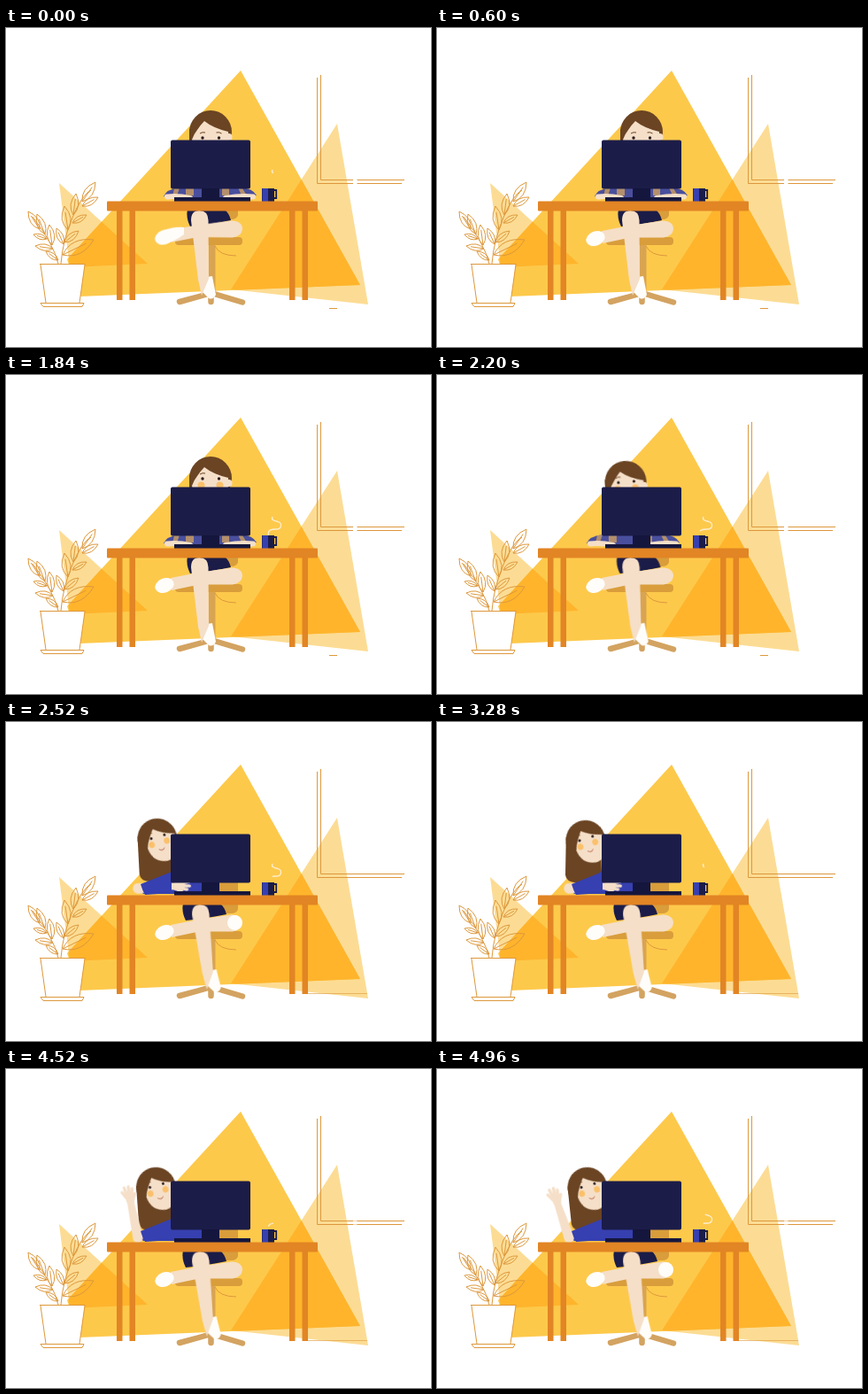
These frames come from a looping animation (480 px wide and 360 px high, 5000 ms). An HTML page:

```html
<!DOCTYPE html>
<html lang="en">
<head>
<meta charset="utf-8">
<title>Waving from the desk</title>
<style>
html, body { margin: 0; width: 100%; height: 100%; overflow: hidden; background: #fff; }
svg { display: block; width: 100vw; height: 100vh; }
.anim, .anim * { animation: 0s linear infinite; }
.line { fill: none; stroke: #dd983c; stroke-width: 1; }
.skin { fill: #f5dfc8; }
.limb { fill: none; stroke: #f5dfc8; stroke-linecap: round; }
.hair { fill: #6b4423; }
.navy { fill: #1b1c48; }
.wood { fill: #e28524; }
.chair { fill: #d99d3b; }
.shirt { fill: #3640b0; }
.foot { fill: #fffdfa; }

#head { animation: head 5s infinite ease-in-out; }
@keyframes head {
  0%, 23.2% { transform: translate(231px, 118px); }
  30%, 41% { transform: translate(231px, 117px); }
  49%, 50.4% { transform: translate(171px, 132px) rotate(-16deg) scale(.93); }
  58%, 65.6% { transform: translate(168px, 134px) rotate(-18deg) scale(.93); }
  74%, 80.8% { transform: translate(169px, 134px) rotate(-16deg) scale(.93); }
  99.2%, 100% { transform: translate(170px, 134px) rotate(-16deg) scale(.93); }
}
#mane { animation: mane 5s infinite ease-in-out; }
@keyframes mane {
  0%, 41% { transform: none; }
  50.4% { transform: rotate(13deg); }
  65.6% { transform: rotate(19deg); }
  80.8% { transform: rotate(14deg); }
  99.2%, 100% { transform: rotate(10deg); }
}
#face { animation: face 5s infinite ease-in-out; }
@keyframes face {
  0%, 41% { transform: none; }
  49%, 100% { transform: translate(4px, 0) scale(.88, 1); }
}
#looks { animation: looks 5s infinite ease-in-out; }
@keyframes looks {
  0%, 24% { transform: translateY(6px); }
  30%, 41% { transform: none; }
  49%, 100% { transform: translate(1px, -2.5px) scale(.9, 1); }
}
#typing { animation: typing 5s infinite ease-in-out; }
@keyframes typing {
  0%, 41% { transform: none; opacity: 1; }
  44.8% { transform: translateX(-10px); opacity: 1; }
  44.81%, 100% { transform: translateX(-10px); opacity: 0; }
}
#lean { animation: lean 5s infinite ease-out; }
@keyframes lean {
  0%, 44.8% { transform: translateX(28px); opacity: 0; }
  44.81% { transform: translateX(28px); opacity: 1; }
  49%, 100% { transform: none; opacity: 1; }
}
#arm { transform-origin: 150px 189px; animation: arm 5s infinite ease-in-out; }
@keyframes arm {
  0%, 67% { transform: rotate(107deg); }
  74.4%, 80.8%, 87.2%, 93.6% { transform: none; }
  77.6%, 84%, 90.4%, 96.8% { transform: rotate(9deg); }
  99.2%, 100% { transform: rotate(2deg); }
}
#shin { transform-origin: 219px 215px; animation: shin 5s infinite ease-in-out; }
@keyframes shin {
  0%, 41% { transform: none; }
  49%, 100% { transform: translateX(1px) rotate(-3.2deg); }
}
#skirt { animation: skirt 5s infinite ease-in-out; }
@keyframes skirt {
  0%, 41% { transform: none; }
  49%, 100% { transform: translateX(-5px); }
}
#cross { transform-origin: 258px 228px; animation: cross 5s infinite ease-in-out; }
@keyframes cross {
  0% { transform: rotate(1deg); }
  23.2% { transform: rotate(-1deg); }
  36.8%, 100% { transform: none; }
}
#knee { animation: knee 5s infinite step-end; }
@keyframes knee {
  0% { opacity: 0; }
  49% { opacity: 1; }
  54% { opacity: 0; }
  95% { opacity: 1; }
}
#sock { animation: sock 5s infinite step-end; }
@keyframes sock { 0% { opacity: 1; } 7% { opacity: 0; } }
#steam { animation: steam 5s infinite linear; }
@keyframes steam {
  0% { stroke-dasharray: .12 2; stroke-dashoffset: -.88; }
  8% { stroke-dasharray: 0 2; stroke-dashoffset: -1; }
  8.01%, 17.9% { stroke-dasharray: 0 2; stroke-dashoffset: 0; }
  23.2% { stroke-dasharray: .35 2; stroke-dashoffset: -.12; }
  36.8% { stroke-dasharray: 1 2; stroke-dashoffset: 0; }
  50.4% { stroke-dasharray: .75 2; stroke-dashoffset: -.25; }
  65.6% { stroke-dasharray: .12 2; stroke-dashoffset: -.88; }
  70% { stroke-dasharray: 0 2; stroke-dashoffset: -1; }
  70.01%, 86% { stroke-dasharray: 0 2; stroke-dashoffset: 0; }
  99.2%, 100% { stroke-dasharray: .6 2; stroke-dashoffset: -.25; }
}
#dash { animation: dash 5s infinite step-end; }
@keyframes dash { 0% { opacity: 1; } 46% { opacity: 0; } }
#floor { animation: floor 5s infinite step-end; }
@keyframes floor { 0% { opacity: 0; } 46% { opacity: .6; } }
#gap { animation: gap 5s infinite step-end; }
@keyframes gap { 0% { opacity: 1; } 46% { opacity: 0; } 76% { opacity: 1; } 88% { opacity: .6; } }
</style>
</head>
<body>
<svg viewBox="0 0 480 360">
  <defs>
    <path id="big" d="M265 48 L400 290 L83 303 L69 261 Z"/>
    <clipPath id="inBig"><use href="#big"/></clipPath>
    <path id="sides" d="M60 175 L160 266 L72 270 Z M374 108 L409 312 L254 295 Z"/>
  </defs>

  <!-- backdrop -->
  <use href="#sides" fill="#fcdc94"/>
  <use href="#big" fill="#fdc94b"/>
  <use href="#sides" fill="#ffb42c" clip-path="url(#inBig)"/>
  <path class="line" stroke-width="1.2" d="M351.5 56 V175.5 H447 M355.5 53 V171.5 H450"/>
  <path id="gap" fill="#fff" d="M392 169 h4.500 v8 h-4.500 z"/>
  <path id="dash" class="line" d="M365 316.500 h9"/>
  <path id="floor" class="line" d="M341 306.500 h67"/>

  <!-- plant -->
  <path fill="#fff" d="M38 266 H89 L83 311 H45 Z"/>
  <path class="line" d="M38 266.500 H89.500 M39 267 L45 310 M89 267 L83 310 M39 310.500 H88 L86 314.500 H42 Z"/>
  <g id="plant" class="line"></g>

  <!-- chair -->
  <path class="chair" d="M207 200 H262 V211 Q261 216 254 216 H215 Q207 216 207 208 Z M240 178 h22 v24 h-22 z"/>
  <path fill="#d9a452" d="M229 244 h7.500 v58 h-7.500 z"/>
  <path fill="none" stroke="#d3a361" stroke-width="6.500" stroke-linecap="round" d="M232 299 L218 303 L196 309 M232 299 L245 303 L267 309.500 M231.500 300 V309"/>
  <rect class="chair" x="191" y="236" width="76" height="9" rx="4"/>
  <path class="line" stroke="#c88a35" d="M236 246 Q241 257 260 257"/>

  <!-- person, upper half -->
  <g id="typing">
    <path fill="#4a4f9d" d="M196 180 H265 Q279 181 283 189 L270 192 H190 L178 190 Q181 182 196 180 Z"/>
    <path fill="#d6a55c" opacity=".75" d="M190 181 l6 -1 -3 10 h-5 z M203 180 h9 v9 h-9 z M244 180 h8 v9 h-8 z M262 180 l5 1 5 8 h-6 z"/>
    <path class="limb" stroke-width="6" d="M182 190.500 Q194 189 208 192 M279 190.500 Q265 189 248 192"/>
  </g>
  <g id="lean">
    <path class="shirt" d="M188 166 H222 V194 H155 Q150 190 151 184 Q168 178 188 166 Z"/>
  </g>
  <g id="head">
    <path id="mane" class="hair" d="M-24 -4 L-24 42 Q-23 50 -12 51 Q6 52 20 36 L18 0 Z"/>
    <ellipse class="hair" cy="-.5" rx="24" ry="24.500"/>
    <g id="face" class="skin">
      <circle cx="20.500" cy="5" r="4"/>
      <path d="M-21 8 Q-19 2 -15 -3 Q-11 -9 -7 -13 Q3 -5 20 -1 V9 Q19 27 1 29 Q-19 27 -21 8 Z"/>
    </g>
    <g id="looks">
      <circle cx="-9" cy="0" r="1.700" fill="#2a1c1c"/>
      <circle cx="9.500" cy="0" r="1.700" fill="#2a1c1c"/>
      <path fill="none" stroke="#6b4423" d="M-12 -5 q3 -2 6 -1 M6.500 -6 q3 -1 6 1"/>
      <circle cx="-10.500" cy="7.500" r="4" fill="#fbc06a"/>
      <circle cx="10.500" cy="7.500" r="4" fill="#fbc06a"/>
      <path fill="none" stroke="#b5563c" d="M-3 15 q4 4 8 0"/>
    </g>
  </g>
  <g id="lean2" style="animation:lean 5s infinite ease-out">
    <g id="arm">
      <path class="skin" d="M144 193 L131 153 L138 150 L155 189 Q155 196 149 196 Q145 196 144 193 Z"/>
      <path class="skin" d="M127 146 Q127 141 134 140 Q139 144 139 152 Q135 156 131 154 Z"/>
      <path class="limb" stroke-width="3.400" d="M129 148 L123.500 143 M130 146 L125 137.500 M132 145 L129.500 135.500 M135 145 L134 137 M137 149 L138 142"/>
    </g>
    <path class="shirt" d="M152 183 L187 169 V193 L157 195 Q154 190 152 183 Z" id="sleeve"/>
  </g>

  <!-- person, lower half -->
  <path id="skirt" class="navy" d="M205 205 H247 Q252 209 254 217 Q230 222 208 224 Q203 214 205 205 Z"/>
  <g id="cross">
    <path class="skin" d="M186 229 Q215 223 255 217.500 Q267 218 267 227 Q266 235 256 236.500 H218 L187 243 Z"/>
    <ellipse class="foot" cx="179" cy="237.500" rx="11" ry="8" transform="rotate(-22 179 237.500)"/>
    <path id="sock" class="foot" d="M178 230 Q190 225 201 226 V234 Q190 243 178 245 Z"/>
    <ellipse id="knee" class="foot" cx="258.500" cy="226.500" rx="8.500" ry="8.500"/>
  </g>
  <g id="shin">
    <path class="foot" d="M221 282 L233 280 L237 301 Q234 307 229 305 L222 298 Z"/>
    <path class="skin" d="M209 217 Q209 206 218.500 206 Q228 206 228.500 217 L229 283 Q226 290 221 302 L217 284 Z"/>
  </g>

  <!-- desk and things on it -->
  <path id="steam" pathLength="1" fill="none" stroke="#fdeed0" stroke-width="1.300" d="M296.500 181 C295 174 301 174 305 174 C312 174 312 167 307 165.500 C303 164.500 299 163.500 301 160"/>
  <path fill="none" stroke="#1b1c48" stroke-width="1.800" d="M302 183 h3.200 v9 h-3.200"/>
  <path class="navy" d="M289 181 h14 v15 h-14 z"/>
  <path class="shirt" d="M289.500 181 h6.500 v15 h-6.500 z"/>
  <rect class="navy" x="186" y="126.500" width="90" height="55" rx="2"/>
  <path fill="#15163d" d="M221 181 h20 v10 h35 v5 h-86 v-5 h31 z"/>
  <path class="wood" d="M125 205 h6.500 v102 h-6.500 z M139.500 205 h6.500 v102 h-6.500 z M320 205 h6.500 v102 h-6.500 z M334.500 205 h6.500 v102 h-6.500 z"/>
  <rect class="wood" x="114" y="195.500" width="238" height="11" rx="1"/>
</svg>
<script>
// base x, base y, tip x, tip y of each leaf
const leaves = [
  [86, 196, 101, 174], [76, 211, 79, 187], [86, 201, 104, 191], [70, 228, 66, 201],
  [75, 220, 91, 211], [66, 242, 82, 229], [64, 256, 99, 239], [65, 244, 57, 226],
  [38, 227, 25, 207], [44, 233, 35, 210], [52, 245, 49, 222], [46, 238, 31, 233],
  [53, 249, 33, 246], [59, 262, 45, 252]
];
const leaf = ([x, y, tx, ty]) => {
  const dx = tx - x, dy = ty - y, w = .36;
  const side = s => `${x + dx * .45 - s * dy * w} ${y + dy * .45 + s * dx * w}`;
  return `M${x} ${y} Q${side(1)} ${tx} ${ty} Q${side(-1)} ${x} ${y} L${x + dx * .75} ${y + dy * .75}`;
};
const stems = "M62 266 Q64 240 75 214 T96 183 M59 266 Q54 244 30 213";
document.getElementById("plant").innerHTML = `<path d="${stems}${leaves.map(leaf).join("")}"/>`;
</script>
</body>
</html>
```
